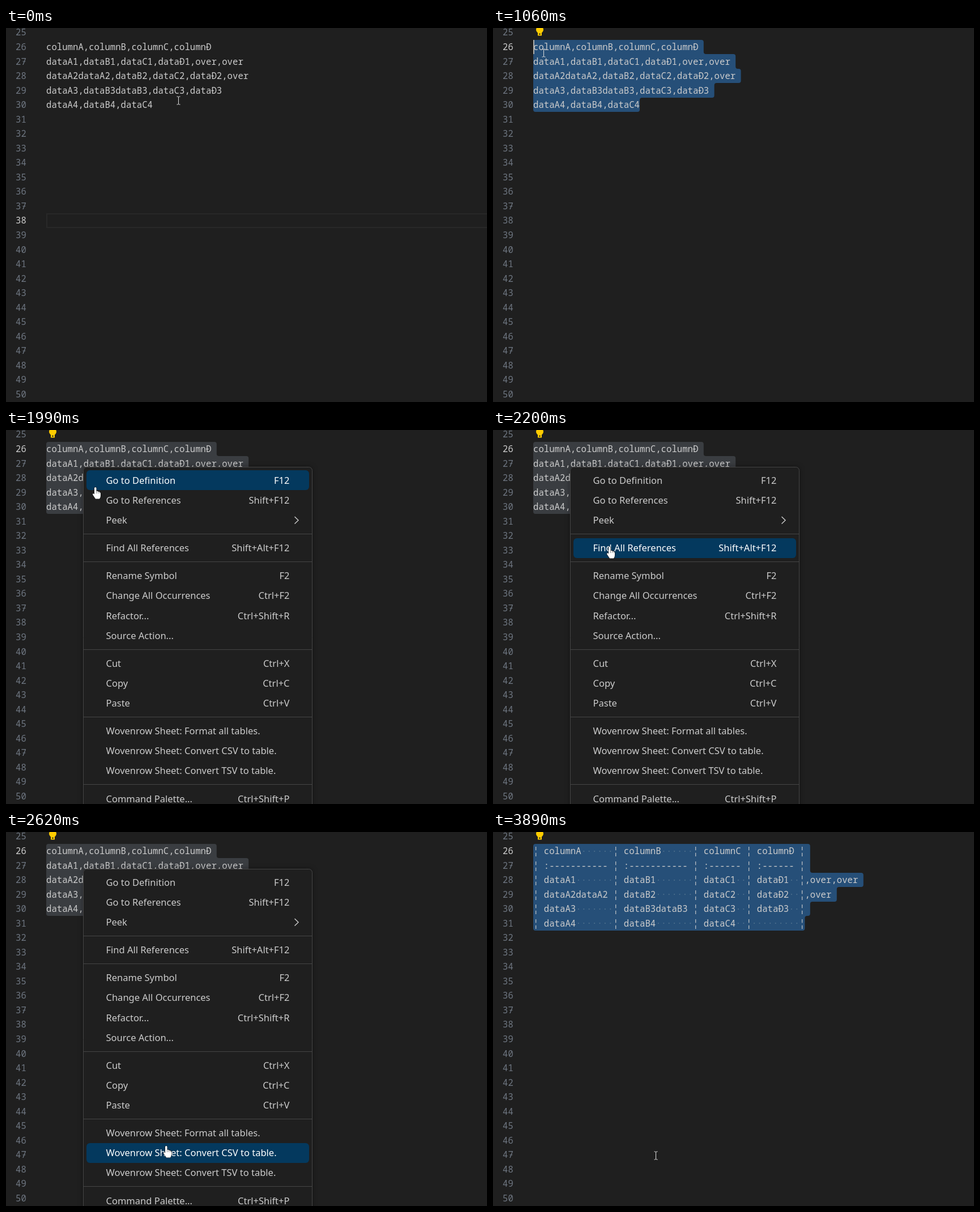
Recreate the animation shown at these times as an HTML page with a canvas. Size 849 px wide and 660 px high, loop 4090 ms.

```html
<!DOCTYPE html>
<html lang="en">
<head>
<meta charset="utf-8">
<title>Editor: CSV to table</title>
<style>
html, body { margin: 0; width: 100%; height: 100%; overflow: hidden; background: #1f1f1f; }
canvas { display: block; }
</style>
</head>
<body>
<canvas id="stage" width="849" height="660"></canvas>
<script>
const ctx = document.getElementById('stage').getContext('2d');
const LOOP = 4090, LEFT = 71, CHAR = 9.4, FIRST = 26;
const TABLE_AT = 3430, MENU_AT = 1590;
const BLUE = '#264f78', GREY = '#3a3d41', TEXT = '#cccccc';
const CODE_FONT = '15.67px "Noto Sans Mono", monospace';
const MENU_FONT = '16.5px "Noto Sans", sans-serif';

const csv = [
  'columnA,columnB,columnC,columnĐ',
  'dataA1,dataB1,dataC1,dataĐ1,over,over',
  'dataA2dataA2,dataB2,dataC2,dataĐ2,over',
  'dataA3,dataB3dataB3,dataC3,dataĐ3',
  'dataA4,dataB4,dataC4'
];

// Convert the CSV lines into aligned table lines
function toTable(lines) {
  const rows = lines.map(l => l.split(','));
  const width = rows[0].map((_, i) => Math.max(...rows.map(r => (r[i] || '').length)));
  rows.splice(1, 0, width.map(w => ':'.padEnd(w, '-')));
  return rows.map(r => {
    const cells = width.map((w, i) => ' ' + (r[i] || '').padEnd(w) + ' ');
    const rest = r.slice(width.length).map(c => ',' + c).join('');
    return '¦' + cells.join('¦') + '¦' + rest;
  });
}
const table = toTable(csv);

const menu = [
  ['Go to Definition', 'F12'], ['Go to References', 'Shift+F12'], ['Peek', '>'], null,
  ['Find All References', 'Shift+Alt+F12'], null,
  ['Rename Symbol', 'F2'], ['Change All Occurrences', 'Ctrl+F2'],
  ['Refactor...', 'Ctrl+Shift+R'], ['Source Action...', ''], null,
  ['Cut', 'Ctrl+X'], ['Copy', 'Ctrl+C'], ['Paste', 'Ctrl+V'], null,
  ['Wovenrow Sheet: Format all tables.', ''],
  ['Wovenrow Sheet: Convert CSV to table.', ''],
  ['Wovenrow Sheet: Convert TSV to table.', ''], null,
  ['Command Palette...', 'Ctrl+Shift+P']
];

// time, x, y of the pointer
const pointer = [
  [0, 302.5, 127.5], [130, 284, 131], [200, 266, 135], [270, 260, 136],
  [330, 242, 127], [400, 206, 107], [470, 156, 78], [530, 119.5, 58.5],
  [600, 100, 50], [670, 84, 42], [730, 74, 37], [800, 70, 35],
  [930, 74, 37], [1000, 88, 43], [1130, 110, 52],
  [1200, 124, 58], [1270, 132, 61], [1330, 137, 63],
  [1790, 140, 72], [1930, 148, 86], [1990, 158, 101], [2060, 172, 124],
  [2130, 188, 158], [2200, 206, 206], [2270, 226, 264], [2340, 249, 380],
  [2410, 262, 440], [2480, 271, 490], [2540, 278, 528], [2610, 283, 554],
  [2680, 285, 566], [2760, 286, 570]
];

// time, line, column where the selection starts
const picks = [
  [270, 30, 20], [330, 30, 18], [400, 29, 14], [470, 28, 9],
  [530, 27, 6], [600, 27, 3], [670, 26, 1], [730, 26, 0]
];

const at = (steps, t) => steps.filter(s => s[0] <= t).pop();
const during = (t, a, b) => t >= a && t < b;
const lineTop = n => Math.round(20.7 + (n - FIRST) * 25.54);
const colX = c => LEFT + c * CHAR;

function rect(x, y, w, h, color) {
  ctx.fillStyle = color;
  ctx.fillRect(x, y, w, h);
}

function disc(x, y, r, color) {
  ctx.fillStyle = color;
  ctx.beginPath();
  ctx.arc(x, y, r, 0, 7);
  ctx.fill();
}

function line(color, width, ...p) {
  ctx.strokeStyle = color;
  ctx.lineWidth = width;
  ctx.beginPath();
  for (let i = 0; i < p.length; i += 2) ctx.lineTo(p[i], p[i + 1]);
  ctx.stroke();
}

function drawCode(str, x, n, color) {
  const base = 39 + (n - FIRST) * 25.54;
  ctx.font = CODE_FONT;
  ctx.textAlign = 'left';
  ctx.fillStyle = color;
  [...str].forEach((ch, i) => {
    const cx = x + i * CHAR;
    ctx.fillText(ch, cx, base);
    if (ch === '7') line(color, 1, cx + 3, base - 5.5, cx + 8, base - 5.5);
  });
}

function drawDots(str, n) {
  for (const run of str.matchAll(/ {2,}/g))
    for (let i = 0; i < run[0].length; i++)
      disc(colX(run.index + i + 0.5), lineTop(n) + 13, 1, '#51728f');
}

// One rounded outline around all selected lines
function drawSelection(lines, row, col, color) {
  const right = [], left = [], last = lines.length - 1;
  for (let i = row - FIRST; i <= last; i++) {
    const n = FIRST + i, top = lineTop(n), end = lineTop(n + 1);
    const r = colX(lines[i].length + (i < last ? 1 : 0));
    const l = n === row ? colX(col) : LEFT;
    if (r <= l) return;
    right.push([r, top], [r, end]);
    left.unshift([l, end], [l, top]);
  }
  const pts = [...right, ...left].filter((p, i, a) => {
    const a0 = a[(i + a.length - 1) % a.length], a1 = a[(i + 1) % a.length];
    return !(a0[0] === p[0] && a1[0] === p[0]);
  });
  const end = pts[pts.length - 1];
  ctx.fillStyle = color;
  ctx.beginPath();
  ctx.moveTo((pts[0][0] + end[0]) / 2, (pts[0][1] + end[1]) / 2);
  pts.forEach((p, i) => ctx.arcTo(...p, ...pts[(i + 1) % pts.length], 4));
  ctx.fill();
}

function drawBulb() {
  disc(82.5, 3, 6.5, '#ffcc00');
  rect(79, 7, 7, 6.5, '#ffcc00');
  rect(81.5, 9.5, 2, 2.5, '#1f1f1f');
}

function drawMenu(hotY) {
  ctx.save();
  ctx.shadowColor = 'rgba(0,0,0,.36)';
  ctx.shadowBlur = 10;
  ctx.fillStyle = '#1f1f1f';
  ctx.beginPath();
  ctx.roundRect(136, 65, 405, 640, 6);
  ctx.fill();
  ctx.restore();
  ctx.strokeStyle = '#454545';
  ctx.lineWidth = 1;
  ctx.beginPath();
  ctx.roundRect(136.5, 65.5, 404, 640, 6);
  ctx.stroke();
  let y = 71.2;
  for (const item of menu) {
    if (!item) {
      rect(136, Math.round(y + 6.4), 405, 1, '#454545');
      y += 14.1;
      continue;
    }
    const hot = hotY >= y && hotY < y + 35.1;
    if (hot) {
      ctx.fillStyle = '#04395e';
      ctx.beginPath();
      ctx.roundRect(142, Math.round(y), 393, 35, 6);
      ctx.fill();
    }
    const [label, key] = item, mid = y + 17.5;
    ctx.font = MENU_FONT;
    ctx.fillStyle = hot ? '#ffffff' : TEXT;
    ctx.textAlign = 'left';
    ctx.fillText(label, 176.5, mid + 6);
    if (key === '>') {
      line(TEXT, 1.4, 509.5, mid - 6, 516, mid + 0.3, 509.5, mid + 6.6);
    } else {
      ctx.textAlign = 'right';
      ctx.fillText(key, 500.5, mid + 6);
    }
    y += 35.1;
  }
}

function drawBeam(x, y) {
  const cx = Math.floor(x + 1.5) + 0.5, cy = Math.round(y + 0.5);
  const c = '#dddddd';
  line(c, 1, cx, cy - 6.5, cx, cy + 6.5);
  for (const s of [-1, 1])
    line(c, 1, cx - 3, cy + s * 7, cx - 1, cy + s * 7, cx, cy + s * 6, cx + 1, cy + s * 7, cx + 3, cy + s * 7);
}

const hand = new Path2D('M-2 1.5Q-2 0 -.2 0Q1.5 0 1.5 1.5V7Q4 6 4.5 8Q7 7 7.2 9' +
  'Q9 8.5 9 10.5V15Q9 18 7 20.5H0L-5 13Q-5 11 -3.5 11L-2 12.5Z');
function drawHand(x, y) {
  ctx.save();
  ctx.translate(x, y);
  ctx.lineWidth = 1.2;
  ctx.strokeStyle = '#111111';
  ctx.stroke(hand);
  ctx.fillStyle = '#ffffff';
  ctx.fill(hand);
  line('#555555', 0.7, 1.5, 7, 1.5, 11);
  line('#555555', 0.7, 4.5, 8, 4.5, 11);
  line('#555555', 0.7, 7.2, 9, 7.2, 11);
  ctx.restore();
}

function draw(t) {
  const done = t >= TABLE_AT;
  const lines = done ? table : csv;
  const pick = at(picks, t);
  const active = pick ? pick[1] : 38;
  const menuOpen = during(t, MENU_AT, TABLE_AT);
  const [, x, y] = at(pointer, t);

  rect(0, 0, 849, 660, '#1f1f1f');
  if (!pick) {
    ctx.strokeStyle = '#282828';
    ctx.lineWidth = 2;
    ctx.strokeRect(72, lineTop(38) + 1, 800, 24);
  } else {
    drawSelection(lines, pick[1], pick[2], during(t, 1460, TABLE_AT) ? GREY : BLUE);
  }
  for (let n = 25; n <= 50; n++)
    drawCode(String(n), 17, n, n === active ? TEXT : '#6e7681');
  lines.forEach((str, i) => {
    if (done) drawDots(str, FIRST + i);
    drawCode(str, LEFT, FIRST + i, TEXT);
  });
  if (during(t, 270, 1460) || during(t, TABLE_AT, 3890))
    rect(Math.round(colX(pick[2])), lineTop(pick[1]), 2, 25, '#aeafad');
  if (t >= 1000) drawBulb();

  if (menuOpen) {
    ctx.globalAlpha = t < 1790 ? 0.85 : 1;
    drawMenu(t < 1790 ? 0 : y);
    ctx.globalAlpha = 1;
  }

  if (during(t, 270, 930) || during(t, 3230, 3360)) disc(x, y + 0.5, 10.5, 'rgba(255,235,0,.55)');
  if (during(t, 1460, MENU_AT)) disc(x, y, 10.5, 'rgba(220,28,28,.68)');
  if (during(t, 1790, TABLE_AT)) drawHand(x, y);
  else if (t < 1790 || t >= 3690) drawBeam(x, y);
}

const start = performance.now();
function tick() {
  draw((performance.now() - start) % LOOP);
  requestAnimationFrame(tick);
}
tick();
</script>
</body>
</html>
```
